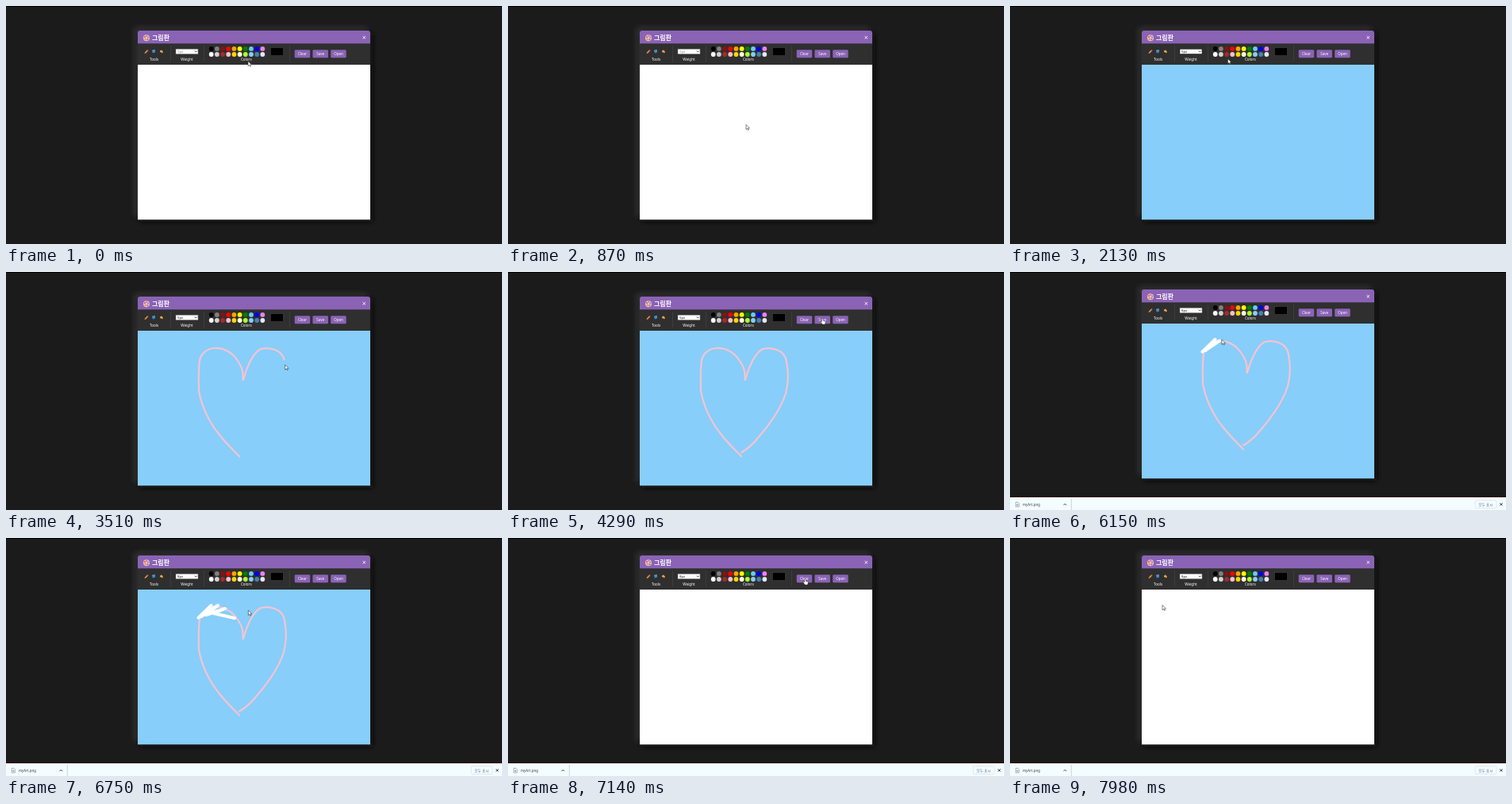
An HTML page for the animation above (8000 ms loop, 625 px wide and 300 px high).

```html
<!DOCTYPE html>
<html lang="ko">
<head>
<meta charset="utf-8">
<style>
  html, body { margin: 0; width: 100%; height: 100%; overflow: hidden; background: #1b1b1b; }
  svg { display: block; width: 625px; height: 300px; }
  text { font: 500 4.6px "Noto Sans", "Noto Sans CJK KR", sans-serif; fill: #fff; }
  .mid { text-anchor: middle; }
  .title { font: 700 8px "Noto Sans CJK KR", "Noto Sans CJK", sans-serif; }
  .line { fill: none; stroke-linecap: round; stroke-linejoin: round; }
  .dark { fill: #333; }
</style>
</head>
<body>
<svg viewBox="0 0 625 300">
  <defs>
    <filter id="blur" x="-10%" y="-10%" width="120%" height="120%"><feGaussianBlur stdDeviation="3"/></filter>
    <clipPath id="page"><rect y="1" width="625" height="299"/></clipPath>
  </defs>
  <rect width="625" height="300" fill="#1b1b1b"/>
  <rect width="625" height="1" fill="#000"/>
  <g id="app" clip-path="url(#page)">
    <rect x="162" y="27" width="293" height="238" fill="#303030" filter="url(#blur)"/>
    <rect x="169" y="34" width="293" height="238" fill="#101010" filter="url(#blur)"/>
    <path d="M166 48V34q0-3 3-3H456q3 0 3 3V48z" fill="#8a63b5"/>
    <rect x="166" y="47.3" width="293" height="26.7" fill="#2f2f2f"/>
    <rect id="canvas" x="166" y="74" width="293" height="195.3"/>

    <circle cx="177" cy="40.2" r="4" fill="#efc3b4"/>
    <g>
      <circle cx="175" cy="39" r="1" fill="#e0465a"/>
      <circle cx="177.3" cy="37.7" r="1" fill="#b56bd0"/>
      <circle cx="179.2" cy="39.6" r="1" fill="#5b8fd6"/>
      <circle cx="175.6" cy="41.8" r="1" fill="#d9843b"/>
      <circle cx="178.4" cy="42.3" r="1" fill="#8a63b5"/>
    </g>
    <text class="title" x="184" y="42.9">그림판</text>
    <path d="M449.6 38l3.4 3.4m0-3.4l-3.4 3.4" stroke="#fff" stroke-width=".9"/>

    <path d="M175.4 59.2l3-3" stroke="#f28c38" stroke-width="1.7"/>
    <path d="M174.6 60l1.2-.4-.8-.8z" fill="#f6d7a8"/>
    <path d="M178.4 56.2l.7-.7" stroke="#e25563" stroke-width="1.7"/>
    <path d="M184.2 56.5l3.8-.9v3l-3.2 1z" fill="#2f8fd0"/>
    <path d="M184 56.4l3.6-1" stroke="#8fd0f3" stroke-width=".7"/>
    <path d="M194 56.2l2.2-.8 1.9 2.6-1.6 1.6z" fill="#f5a63c"/>
    <path d="M194 58l1.3-.7" stroke="#f7df74" stroke-width="1"/>
    <path d="M207.5 50V70M249.5 50V70M357.5 50V70" stroke="#414141" stroke-width=".8"/>
    <rect id="select" x="214" y="54.2" width="28" height="6.3" fill="#fff" stroke="#777" stroke-width=".5"/>
    <text id="weight" class="dark" x="216" y="59" style="font-size:4.3px;fill:#222"></text>
    <path d="M237.8 56.6l1.5 1.5 1.5-1.5" fill="none" stroke="#222" stroke-width=".8"/>
    <text class="mid" x="186.5" y="68.6">Tools</text>
    <text class="mid" x="228" y="68.6">Weight</text>
    <text class="mid" x="302.8" y="68.6">Colors</text>
    <g id="swatches"></g>
    <rect x="333.3" y="52.5" width="16" height="10" fill="#000" stroke="#4a4a4a" stroke-width=".5"/>
    <g id="buttons"></g>

    <path id="left" class="line" stroke="#f7c3d0" stroke-width="2.2"
      d="M298.5 136C299 126 298 121 292 112C285 101 274 95 262 96C252 97 245 104 244 112C242 125 243 140 243 150C247 172 258 192 268 204C278 217 287 225 294 232.5"/>
    <path id="right" class="line" stroke="#f7c3d0" stroke-width="2.2"
      d="M299 136C303 120 311 103 320 97.5C330 94 349 97 351 113C354 130 353 140 350 153C343 175 325 198 315 209C308 218 300 224 294 227.5"/>
    <path id="erase" class="line" stroke="#fff" stroke-width="4"
      d="M242.5 109.5L258.5 94L246 108L262 97L267 94L252 106L276 98L262 104L288 110"/>
  </g>

  <g id="bar">
    <rect y="282.6" width="625" height="1.4" fill="#2c0b12"/>
    <rect y="284" width="625" height="16" fill="#f3fdff"/>
    <path d="M77.3 286V300" stroke="#b9c6cc" stroke-width=".7"/>
    <g id="spinner" fill="none">
      <circle cx="9" cy="293" r="3.7" stroke="#9cb9d8" stroke-width="1"/>
      <path d="M9 289.3A3.7 3.7 0 1 1 5.3 293" stroke="#3f78b8" stroke-width="1"/>
    </g>
    <path d="M7.3 290.2h2.7l1.3 1.3v4.4h-4z" fill="#fff" stroke="#6d7880" stroke-width=".6"/>
    <circle cx="9.3" cy="293.6" r=".9" fill="#4a7fb5"/>
    <text class="dark" x="16" y="294.7" style="font-size:4.4px;fill:#444">myArt.png</text>
    <path d="M67.7 293.8l1.6-1.6 1.6 1.6" fill="none" stroke="#333" stroke-width="1"/>
    <rect x="586.3" y="288" width="26.5" height="9.6" rx="1" fill="#f6fdff" stroke="#cfdbe3" stroke-width=".6"/>
    <text class="mid" x="599.4" y="294.6" style="font-size:4.6px;fill:#5878a8">모두 표시</text>
    <path d="M617.4 291.2l3.2 3.2m0-3.2l-3.2 3.2" stroke="#222" stroke-width=".9"/>
  </g>

  <g id="cursor">
    <path id="arrow" d="M0 0V6.2L1.5 4.9 2.5 7 3.5 6.5 2.6 4.5H4.4Z" fill="#fff" stroke="#222" stroke-width=".55"/>
    <path id="hand" d="M-.5 0Q.5-.9 1.2 0V2.4L3.8 3Q4.5 3.3 4.2 4.5L3.5 7H.2L-1.8 4.2Q-2-.0 -.5 3.6Z" fill="#fff" stroke="#222" stroke-width=".5"/>
  </g>
</svg>
<script>
const LOOP = 8000, FILL = 900, SAVED = 4400, CLEARED = 7080, SHIFT = 9, LAG = 15;
const $ = id => document.getElementById(id);

const colors = [
  ['#000', '#808080', '#8b1010', '#f00', '#ffa500', '#ff0', '#008000', '#6cc9f5', '#00f', '#ee82ee'],
  ['#fff', '#d3d3d3', '#a52a2a', '#ffc0cb', '#ffd700', '#ffffe0', '#adff2f', '#87cefa', '#4682b4', '#e6e6fa']
];
$('swatches').innerHTML = colors.map((row, r) => row.map((color, i) =>
  `<circle cx="${258.7 + i * 7.18}" cy="${53.9 + r * 7.1}" r="2.9" fill="${color}"/>`).join('')).join('');
$('buttons').innerHTML = ['Clear', 'Save', 'Open'].map((label, i) => {
  const x = 363.7 + i * 22.75;
  return `<rect x="${x}" y="55.2" width="19.5" height="10" rx="1.3" fill="#8a63b5"/>
    <text class="mid" x="${x + 9.75}" y="61.9" style="font-size:4.5px">${label}</text>`;
}).join('');

// Each stroke maps time to the drawn share of its path.
const strokes = [
  { id: 'left', steps: [[2500, 0], [3190, 1]] },
  { id: 'right', steps: [[3310, 0], [3510, .4], [3760, 1]] },
  { id: 'erase', steps: [[5850, 0], [6150, .434], [6650, 1]] }
].map(s => ({ ...s, path: $(s.id), length: $(s.id).getTotalLength() }));

// Pointer stops between strokes: time, x, y.
const stops = [
  [0, 305, 69.5], [300, 309, 61], [420, 309, 61], [780, 300, 148], [920, 300, 150],
  [1300, 178, 57], [1400, 178, 57], [1650, 224, 58], [1900, 224, 58], [2130, 274.5, 66.5],
  [2220, 280, 61], [2280, 280, 61], [2500, 298.5, 136], [3190, 294, 232.5], [3310, 299, 136],
  [3760, 294, 227.5], [4030, 396, 59], [4450, 396, 59], [5100, 221, 74.5], [5300, 196, 49],
  [5380, 196, 49], [5550, 225, 48], [5700, 225, 48], [5850, 242.5, 100.5], [6650, 288, 101],
  [7000, 374, 52], [7350, 374, 52], [7800, 192, 84.5], [8000, 192, 84.5]
];

const ease = u => u * u * (3 - 2 * u);
const clamp = u => Math.max(0, Math.min(1, u));

function sample(steps, t, curve = u => u) {
  let i = 0;
  while (i < steps.length - 2 && t >= steps[i + 1][0]) i++;
  const [a, b] = [steps[i], steps[i + 1]];
  const u = curve(clamp((t - a[0]) / (b[0] - a[0])));
  return a.slice(1).map((v, k) => v + (b[k + 1] - v) * u);
}

function pointer(t, lift) {
  const active = strokes.find(s => t >= s.steps[0][0] && t < s.steps.at(-1)[0]);
  if (!active) return sample(stops, t, ease);
  const p = active.path.getPointAtLength(sample(active.steps, t)[0] * active.length);
  return [p.x, p.y - lift];
}

function show(id, on) { $(id).setAttribute('visibility', on ? 'visible' : 'hidden'); }

function draw(t) {
  const saved = t >= SAVED, lift = saved ? SHIFT : 0;
  $('app').setAttribute('transform', `translate(0 ${-lift})`);
  $('canvas').setAttribute('fill', t >= FILL && t < CLEARED ? '#87cefa' : '#fff');
  $('weight').textContent = t < 1850 ? '1px' : t < 5650 ? '5px' : '8px';
  $('weight').style.fill = t < 1850 ? '#888' : '#222';
  $('select').setAttribute('stroke', t >= 1650 && t < 2300 ? '#111' : '#777');

  for (const { path, steps, length } of strokes) {
    const share = sample(steps, t - LAG)[0];
    path.style.strokeDasharray = `${share * length} ${length + 9}`;
    path.setAttribute('visibility', share > 0 && t < CLEARED ? 'visible' : 'hidden');
  }

  $('bar').style.display = saved ? '' : 'none';
  const loading = t < 5400;
  $('spinner').style.display = loading ? '' : 'none';

  const [x, y] = pointer(t, lift);
  const onButton = x > 363 && x < 429 && y + lift > 55 && y + lift < 65;
  $('cursor').setAttribute('transform', `translate(${x} ${y})`);
  show('arrow', !onButton);
  show('hand', onButton);
}

const start = performance.now();
function tick() {
  draw((performance.now() - start) % LOOP);
  requestAnimationFrame(tick);
}
tick();
</script>
</body>
</html>
```
